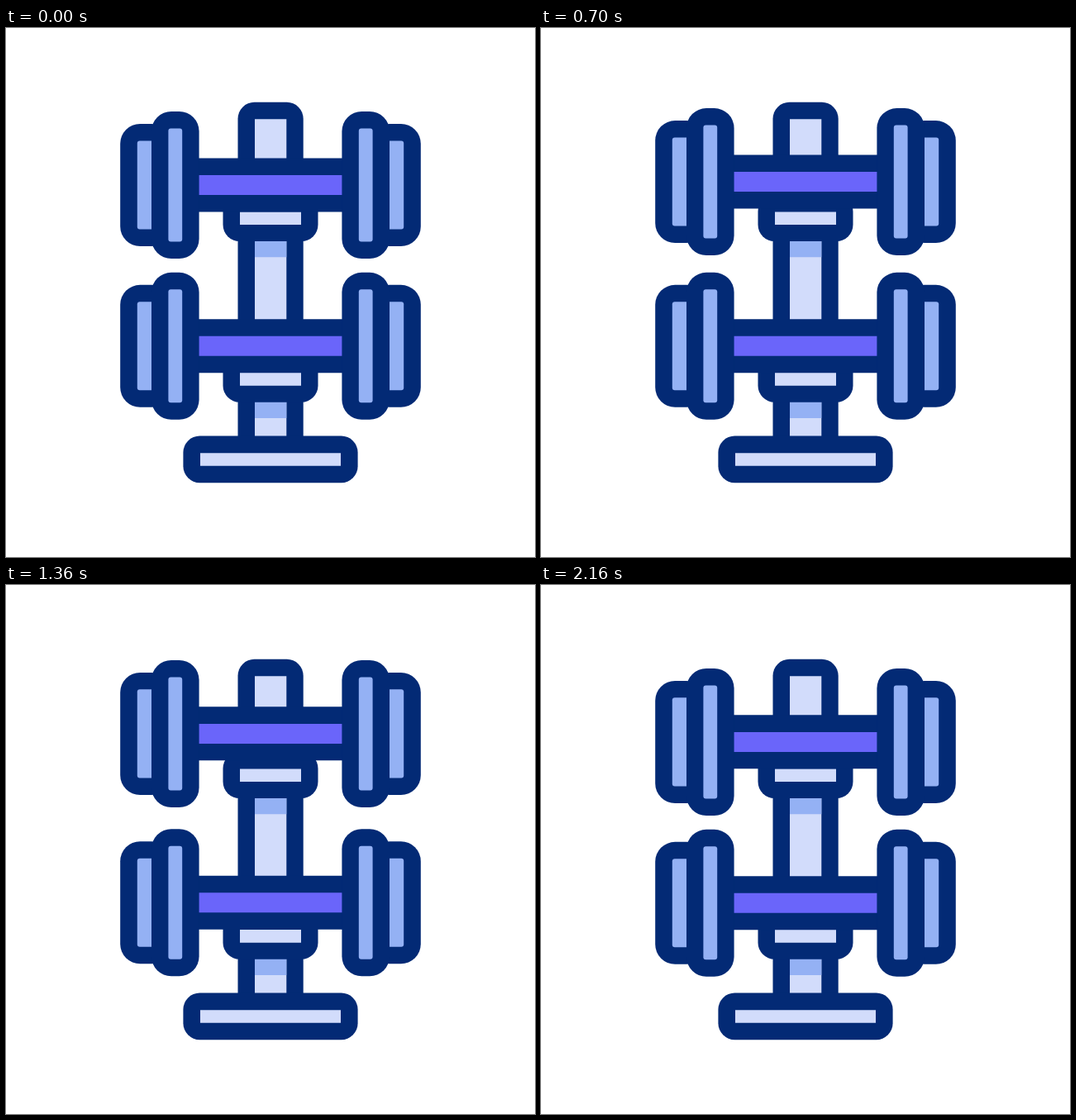
Animation of 640x640 px, one loop 2400 ms. Source, as an HTML page with a canvas:

```html
<!DOCTYPE html>
<html lang="en">
<head>
<meta charset="utf-8">
<title>Dumbbell rack</title>
<style>
html, body { margin: 0; width: 100%; height: 100%; overflow: hidden; background: #fff; }
canvas { display: block; width: 640px; height: 640px; }
</style>
</head>
<body>
<canvas id="stage" width="640" height="640"></canvas>
<script>
const ctx = document.getElementById('stage').getContext('2d');
const NAVY = '#032a75', PALE = '#d2dcfb', BLUE = '#94b1f4', VIOLET = '#6a65fa';
const LOOP = 2400, STEP = 20;
const HALF = 347.5, LIFTS = 3, HEIGHT = 75.6;

// Box given by its left, top, right and bottom edges.
function box(color, l, t, r, b, radius = 0) {
  ctx.fillStyle = color;
  ctx.beginPath();
  ctx.roundRect(l, t, r - l, b - t, radius);
  ctx.fill();
}

// Symmetric cubic-bezier(.68, 0, .32, 1).
function ease(x) {
  const a = 0.68;
  let lo = 0, hi = 1;
  for (let i = 0; i < 30; i++) {
    const m = (lo + hi) / 2, n = 1 - m;
    const at = 3 * a * m * n * n + 3 * (1 - a) * m * m * n + m * m * m;
    if (at < x) lo = m; else hi = m;
  }
  return lo * lo * (3 - 2 * lo);
}

function lift(t, start) {
  const p = (t - start) / HALF;
  if (p <= 0 || p >= LIFTS * 2) return 0;
  const phase = p % 2;
  return -HEIGHT * ease(phase < 1 ? phase : 2 - phase);
}

function collar(y) {
  box(BLUE, 301, y + 50, 339.3, y + 75.3);
  box(NAVY, 262.5, y, 377.5, y + 56, 20);
  box(PALE, 283, y + 20.4, 357, y + 36);
}

function rack() {
  box(NAVY, 280.5, 89.8, 359.7, 510, [20, 20, 0, 0]);
  box(PALE, 301, 110.2, 339.3, 500);
  collar(202);
  collar(396.7);
  box(NAVY, 214.4, 493.6, 425.6, 550.2, 20);
  box(PALE, 235, 514.2, 405, 529.8);
}

function plates() {
  box(NAVY, 138.2, 116, 200, 264, 24);
  box(BLUE, 158.8, 136.4, 190, 243.5, 3);
  box(NAVY, 176, 101, 233.6, 279, 24);
  box(BLUE, 196.4, 121.5, 213.2, 258.5, 3);
}

function dumbbell(y) {
  ctx.save();
  ctx.translate(0, y);
  box(NAVY, 220, 157.4, 420, 222.4);
  box(VIOLET, 230, 178, 410, 202);
  plates();
  ctx.translate(640, 0);
  ctx.scale(-1, 1);
  plates();
  ctx.restore();
}

function draw(t) {
  box('#fff', 0, 0, 640, 640);
  rack();
  dumbbell(194.8 + lift(t, 3));
  dumbbell(lift(t, 84));
}

const begin = performance.now();
function tick() {
  const t = (performance.now() - begin) % LOOP;
  draw(Math.floor(t / STEP) * STEP);
  requestAnimationFrame(tick);
}
tick();
</script>
</body>
</html>
```
